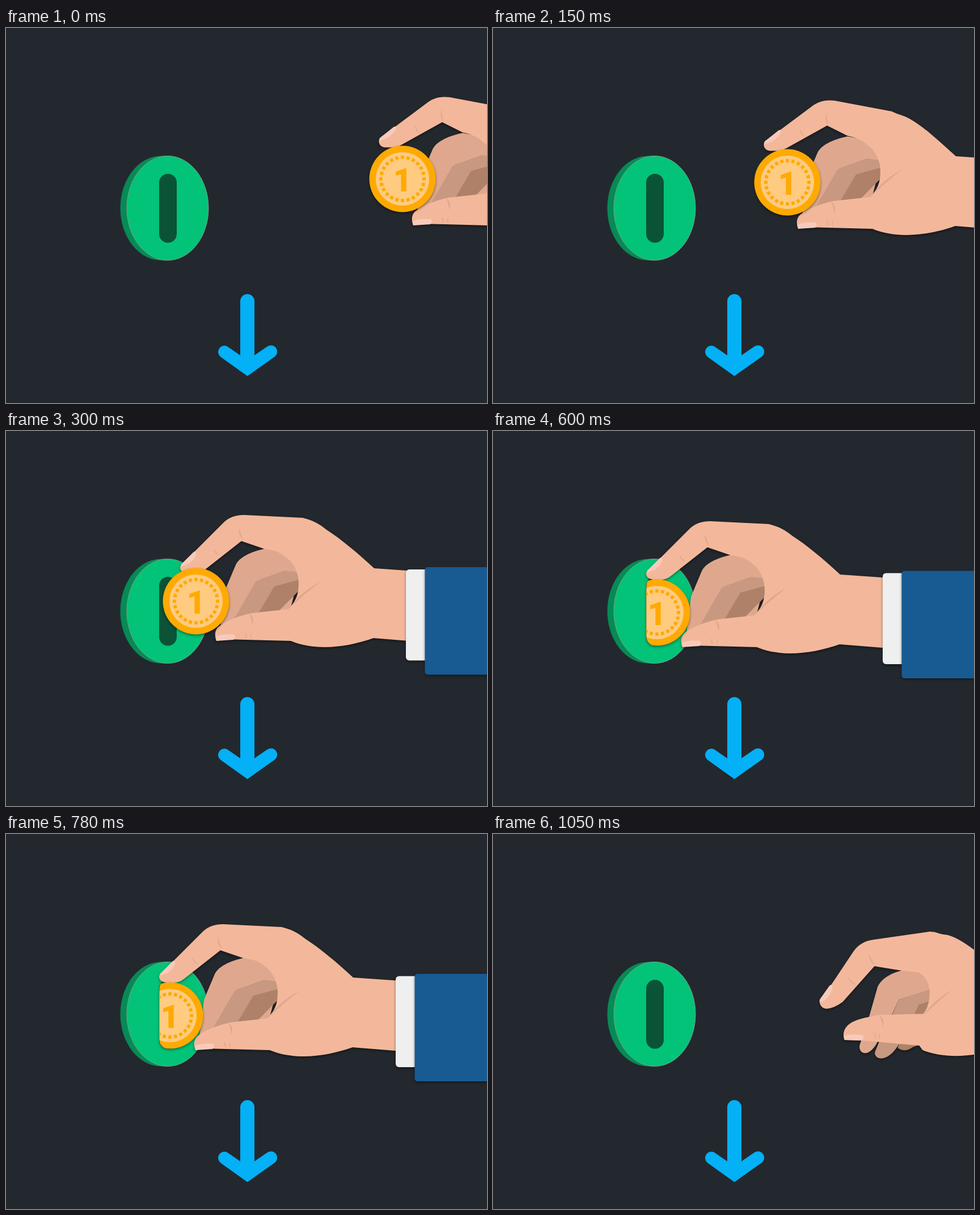
Write an HTML page that moves like this. It is 848 px wide and 661 px high and loops after 1200 ms.

```html
<!DOCTYPE html>
<html lang="en">
<head>
<meta charset="utf-8">
<title>Coin slot</title>
<style>
  html, body { margin: 0; height: 100%; overflow: hidden; background: #23282e; }
  svg { display: block; width: 100%; height: 100%; }
  .lift { filter: drop-shadow(0 2px 2px rgba(0, 0, 0, .45)); }
  .skin { fill: #f3b89b; }
  .tan { fill: #dfa88e; }
  .mid { fill: #c89880; }
  .dark { fill: #ae8168; }
  .nail { fill: #f8cabb; }
  text { font: 900 57px Roboto, sans-serif; text-anchor: middle; }
</style>
</head>
<body>
<svg viewBox="0 0 848 661">
  <defs>
    <clipPath id="inSlot"><rect x="270.5" y="257" width="300" height="121.5" rx="15.5"/></clipPath>
  </defs>

  <path fill="#04b0f6" d="M413 481.500a12.500 12.500 0 0 1 25 0V577L460.500 561.500A11 11 0 0 1 473.500 579.500L425.500 613.500L378 579.500A11 11 0 0 1 390.500 561.500L413 577Z"/>

  <path fill="#068a56" d="M285 225.500H273.500a72 92 0 0 0 0 184H285Z"/>
  <ellipse cx="285" cy="317.500" rx="72" ry="92" fill="#02c378" stroke="#7f9f86"/>
  <rect x="270" y="257" width="31" height="121.500" rx="15.500" fill="#0a5337"/>

  <g id="hand" class="lift"></g>

  <g id="arm">
    <rect class="lift" width="45" height="160.500" rx="6" fill="#efefef"/>
    <rect class="lift" x="33.500" y="-4" width="300" height="189.500" rx="5" fill="#185a92"/>
  </g>

  <g class="lift">
    <g id="clip">
      <g id="coin" fill="#ffaa02">
        <circle r="58.500"/>
        <circle r="47" fill="#fecb81"/>
        <circle r="38" fill="none" stroke="#ffaa02" stroke-width="6" pathLength="48" stroke-dasharray="1.15 .85" stroke-dashoffset=".575"/>
        <text y="22">1</text>
      </g>
    </g>
  </g>
</svg>
<script>
const $ = id => document.getElementById(id);
const shape = (cls, d) => `<path class="${cls}" d="${d}Z"/>`;

// A thin leaf between two points, bowed sideways by a and b
const crease = (x1, y1, x2, y2, a, b) => {
  const len = Math.hypot(x2 - x1, y2 - y1);
  const nx = (y1 - y2) / len, ny = (x2 - x1) / len;
  const bow = k => `${(x1 + x2) / 2 + nx * k} ${(y1 + y2) / 2 + ny * k}`;
  return shape('tan', `M${x1} ${y1}Q${bow(a)} ${x2} ${y2}Q${bow(b)} ${x1} ${y1}`);
};

// Fist, thumb and wrist shared by both gripping poses
const grip = (index, nail, creases) =>
  shape('tan', 'M458 207C430 213 411 223 405 236L386 281L378 346L500 319L518 250L500 215') +
  shape('mid', 'M401 333L438 269Q440 265 444 263L491 246L517 249V268L470 322') +
  shape('dark', 'M444 323L473 274L517 262V281L482 316') +
  shape('skin', index +
    'C482 211 488 218 497 225C505 232 511 241 515 257C518 280 514 298 498 314L433 321' +
    'C410 326 388 335 376 344C368 350 367 360 371 370L385 367L502 370' +
    'C545 388 600 382 648 365L735 372V248L649 242') +
  shape('nail', nail) + creases +
  shape('nail', 'M370 363C379 358 392 358 402 359Q406 363 401 368L371 370') +
  crease(555, 265, 498, 314, 9, 2) +
  crease(428, 321, 434, 343, -9, -3) +
  crease(421, 354, 424, 367, -3, 1) +
  crease(433, 354, 432, 367, 3, 0);

const poses = {
  reach: grip(
    'M649 242C603 201 578 176 545 167L536 163L435 144C421 142 408 145 398 152L339 196L313 215' +
    'C308 220 310 232 322 232.500H335Q343 232 350 228L422 188L458 206',
    'M312 216L337 196Q341 195 341 198Q338 207 325 216Q318 219 311 221',
    crease(421, 165, 425, 188, 7, 2) + crease(373, 193, 383, 209, 4, 0)),
  hold: grip(
    'M649 242C620 215 590 190 565 174C553 164 540 157 523 153L420 148C405 148 394 152 385 160L333 212L309 235' +
    'C304 243 309 250 320 251H333Q342 251 350 245L415 194L456 208',
    'M309 235L331 213Q336 211 335 218Q331 228 322 234Q315 236 309 239',
    crease(411, 170, 419, 193, 7, 2) + crease(365, 207, 376, 220, 4, 0)),
  open:
    shape('dark', 'M551 318L560 301L581 292V310L560 372L550 376Q536 386 524 377L535 345') +
    shape('mid', 'M514 319L526 292L581 274V294L561 301L545 335L526 371C518 383 511 391 502 394C490 399 482 391 484 384L500 345') +
    shape('tan', 'M533 240C505 247 490 260 487 275L473 324L457 372C455 383 463 389 472 385C479 381 484 375 488 367L514 318L526 292L582 274V240') +
    shape('skin', 'M714 253C672 213 640 186 612 178Q600 177 590 173L581 172L483 186C467 188 455 194 446 207L408 264L386 293' +
      'C386 303 392 308 399 308Q412 307 427 296L483 233L532 241Q548 242 560 244C575 250 582 268 580 288' +
      'C578 303 574 311 569 317L490 319C465 324 450 327 440 334C430 341 426 351 430 363L462 364L562 373L568 381' +
      'C610 398 665 392 711 376L800 383V259') +
    shape('nail', 'M387 291L404 267Q409 264 409 271Q406 284 397 292Q391 295 387 297') +
    shape('nail', 'M429 356C440 352 452 353 463 355Q466 360 460 364L430 363') +
    crease(473, 211, 485, 232, 7, 2) +
    crease(436, 253, 451, 267, 4, 0) +
    crease(620, 275, 569, 321, 9, 2) +
    crease(491, 319, 497, 340, -9, -3) +
    crease(482, 349, 486, 363, -3, 1) +
    crease(493, 350, 491, 364, 3, 0)
};

// Each step holds until its end time, then jumps
const steps = [
  { end: 150,  pose: 'reach', hand: [347, -22], coin: [699, 266], arm: [1052, 222] },
  { end: 300,  pose: 'reach', hand: [167, -16], coin: [519, 272], arm: [872, 228] },
  { end: 600,  pose: 'hold',  hand: [0, 0],     coin: [335, 300], arm: [705, 244] },
  { end: 900,  pose: 'hold',  hand: [-37, 11],  coin: [289, 320], arm: [687, 250.5], clip: true },
  { end: 1050, pose: 'open',  hand: [0, 0],     arm: [788, 250.5] },
  { end: 1200, pose: 'open',  hand: [189.5, 0], arm: [977.5, 250.5] }
];

const move = (id, at) => $(id).setAttribute('transform', `translate(${at})`);
let current;

function draw(step) {
  $('hand').innerHTML = poses[step.pose];
  move('hand', step.hand);
  move('arm', step.arm);
  $('coin').style.display = step.coin ? '' : 'none';
  if (step.coin) move('coin', step.coin);
  $('clip').setAttribute('clip-path', step.clip ? 'url(#inSlot)' : 'none');
}

const start = performance.now();
function tick() {
  const t = (performance.now() - start) % 1200;
  const step = steps.find(s => t < s.end);
  if (step !== current) draw(current = step);
  requestAnimationFrame(tick);
}
tick();
</script>
</body>
</html>
```
